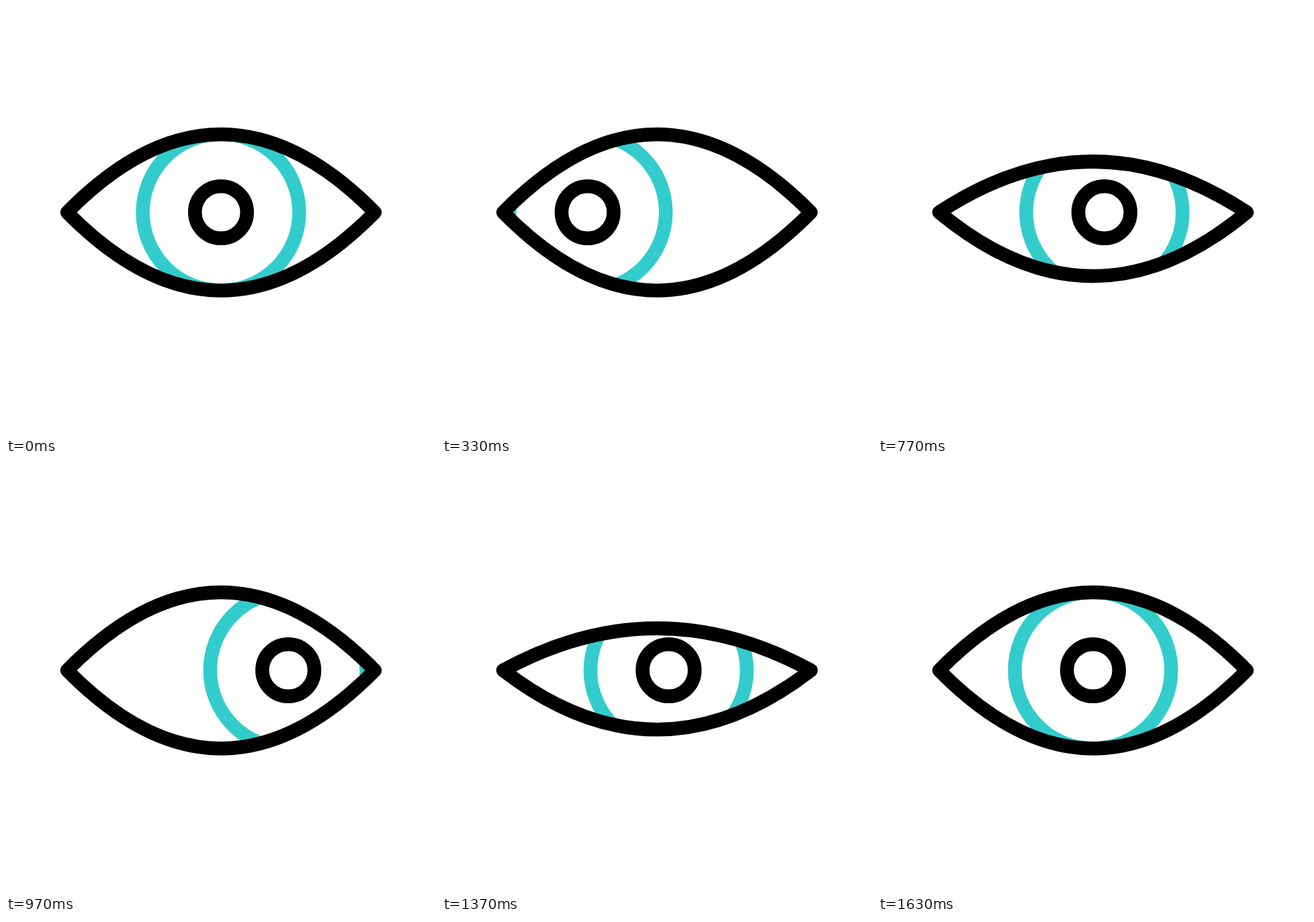
An HTML page for the animation above (2000 ms loop, 640 px wide and 640 px high).

```html
<!DOCTYPE html>
<html lang="en">
<head>
<meta charset="utf-8">
<title>Eye</title>
<style>
html, body { margin: 0; width: 100%; height: 100%; overflow: hidden; background: #fff; }
svg { display: block; width: 100%; height: 100%; }
</style>
</head>
<body>
<svg viewBox="0 0 640 640" fill="none" stroke="#000" stroke-width="20.5" stroke-linejoin="round">
  <clipPath id="opening"><path class="lids"/></clipPath>
  <g clip-path="url(#opening)">
    <g id="iris">
      <circle cx="320" cy="307" r="116.4" stroke="#33cccc"/>
      <circle cx="320" cy="307" r="38.8"/>
    </g>
  </g>
  <path class="lids"/>
</svg>
<script>
const LOOP = 2000, FPS = 30, LAST = 49;
// Keyframes as [frame, value], eased in and out between neighbours.
const GAZE = [[0, 0], [13, -119.4], [15.45, -119.4], [28.45, 100.5], [45.5, 0]];
const BLINK = [[13, 0], [19, 1], [25.05, 0], [39, 0], [44, 1], [49, 0]];

const lids = document.querySelectorAll(".lids");
const iris = document.getElementById("iris");

function valueAt(keys, frame) {
  if (frame <= keys[0][0]) return keys[0][1];
  const next = keys.findIndex(key => key[0] > frame);
  if (next < 0) return keys[keys.length - 1][1];
  const [t0, a] = keys[next - 1], [t1, b] = keys[next];
  const u = (frame - t0) / (t1 - t0);
  return a + (b - a) * u * u * (3 - 2 * u);
}

function draw(now) {
  const ms = now % LOOP;
  const frame = Math.min(LAST, Math.floor((ms + 3.4) * FPS / 1000));
  const closed = valueAt(BLINK, frame);
  const top = 190.9 + 152.4 * closed;
  const bottom = 423.4 - 80.1 * closed;
  // A quadratic's control point lies twice as far from the corners as its peak.
  const control = peak => 2 * peak - 307.1;
  const d = `M91 307.1Q320 ${control(top)} 549 307.1Q320 ${control(bottom)} 91 307.1Z`;
  lids.forEach(path => path.setAttribute("d", d));
  iris.setAttribute("transform", `translate(${valueAt(GAZE, frame)})`);
}

const start = performance.now();
function tick() {
  draw(performance.now() - start);
  requestAnimationFrame(tick);
}
tick();
</script>
</body>
</html>
```
